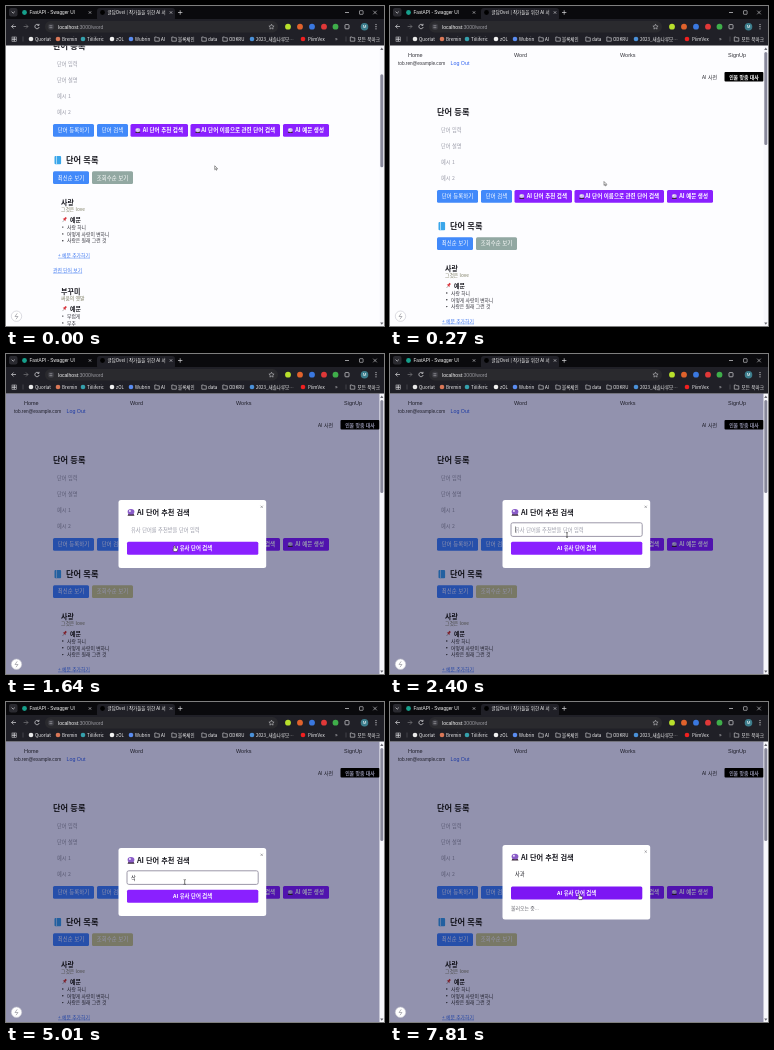
Animation, 378 px wide and 320 px high, one loop 8000 ms. Source, as an HTML page:

```html
<!DOCTYPE html>
<html lang="ko">
<head>
<meta charset="utf-8">
<style>
html, body { margin: 0; width: 100%; height: 100%; overflow: hidden; background: #fdfdff; }
svg { display: block; width: 378px; height: 320px; font-family: "Noto Sans CJK KR", "Noto Sans CJK", "Noto Sans", sans-serif; }
text { white-space: pre; }
#shade { mix-blend-mode: multiply; }
.latin { font-family: "Liberation Sans", Arial, sans-serif; }
.b { font-weight: 700; }
.m { font-weight: 500; }
.u { text-decoration: underline; text-decoration-thickness: 0.4px; }
.end { text-anchor: end; }
.mid { text-anchor: middle; }
</style>
</head>
<body>
<svg id="stage" viewBox="0 0 378 320" xmlns="http://www.w3.org/2000/svg"></svg>
<script>
const LOOP = 8000;
const BLUE = '#4189fa', PURPLE = '#8a20ff', INK = '#1d1d24', GREY = '#9a9ba8', PALE = '#d8d8dc';
const STRIP = '#0a0a0d', BAR = '#202027';

// y is the vertical middle of the text
const text = (x, y, size, str, fill = INK, cls = '') =>
  `<text x="${x}" y="${(y + size * 0.36).toFixed(2)}" font-size="${size}" fill="${fill}" class="${cls}">${str}</text>`;
const rect = (x, y, w, h, fill, r = 0, extra = '') =>
  `<rect x="${x}" y="${y}" width="${w}" height="${h}" rx="${r}" fill="${fill}" ${extra}/>`;
const dot = (x, y, r, fill, extra = '') => `<circle cx="${x}" cy="${y}" r="${r}" fill="${fill}" ${extra}/>`;
const line = (d, stroke = PALE, w = 0.7) => `<path d="${d}" fill="none" stroke="${stroke}" stroke-width="${w}"/>`;
const folder = (x, y) => line(`M${x - 2.2} ${y - 2}h1.8l.7.8h2v3.4h-4.5z`, PALE, 0.6);
const cross = (x, y, r, c) => line(`M${x - r} ${y - r}l${2 * r} ${2 * r}m0 ${-2 * r}l${-2 * r} ${2 * r}`, c, 0.6);
const orb = (x, y, s, fill) => `<g transform="translate(${x} ${y}) scale(${s})">
  <path d="M-2.6 2.6L-1.8 1H1.8L2.6 2.6Z" fill="#3a2838"/><ellipse cy="-.4" rx="2.5" ry="2.1" fill="${fill}"/>${dot(-0.8, -1, 0.7, '#f4ecff')}</g>`;
const pin = (x, y) => line(`M${x} ${y}l-2 2.4`, '#888', 0.6) +
  `<path d="M${x - 1.8} ${y - 1}L${x + 1} ${y + 1.6}L${x + 1} ${y}L${x + 2.4} ${y - 1.6}L${x + 1} ${y - 2.8}L${x - 0.4} ${y - 1.2}Z" fill="#d8343c"/>`;

function browser() {
  const marks = [
    [25, 29, 'Quorlat', '#e8e8e8'], [52, 56, 'Bremin', '#d97757'], [77, 81, 'Tilliferic', '#35a0ac'],
    [106, 110, 'zOL', '#f0f0f0'], [125, 129, 'Wubrin', '#5a8cf0'], [151, 155, 'AI'], [168, 172, '블록체인'],
    [198, 202, 'data'], [219, 223, 'ODKRU'], [246, 250, '2023_새솔나루모…', '#4a90d8'], [297, 302, 'PlimVex', '#f02020']
  ];
  const tools = [[282, '#b8e02c'], [294, '#e0622c'], [306, '#3a78e0'], [318, '#e03838'], [329.5, '#3fae4a']];
  return rect(0, 0, 378, 14, STRIP) + rect(0, 13, 378, 26.5, BAR) +
    rect(3, 2, 8.5, 8.5, '#2a2a30', 2) + line('M5.6 5.6l1.6 1.6l1.6-1.6') +
    dot(18.5, 6.5, 2.4, '#16a08c') + text(23.5, 6.5, 4.7, 'FastAPI - Swagger UI', '#f2f2f2', 'latin') + cross(84, 6.5, 1.2, PALE) +
    rect(91, 2, 78, 13, BAR, 3) + dot(96.5, 6.5, 2.4, '#000') +
    text(101.5, 6.5, 4.5, '글담Ovel | 작가들을 위한 AI 서', '#f2f2f2') + rect(160, 2, 3, 10, BAR) + cross(165, 6.5, 1.2, PALE) +
    line('M172 6.5h4.4M174.2 4.3v4.4') +
    line('M339 6.5h4') + rect(353.5, 4.7, 3.6, 3.6, 'none', 0.4, `stroke="${PALE}" stroke-width=".6"`) + cross(369, 6.5, 1.8, PALE) +
    line('M10 20.5H5.6m2-2l-2 2l2 2') + line('M17.6 20.5H22m-2-2l2 2l-2 2', '#77777c') +
    line('M32.8 19.2a2.2 2.2 0 1 0 .4 1.8M33 17.8v1.6h-1.6') +
    rect(39, 15, 233, 11.5, '#2a2a2e', 5.7) + dot(45, 20.7, 3.2, '#3a3a40') +
    line('M43.4 19.8h3M43.4 21.7h3', PALE, 0.5) +
    text(52, 20.7, 5.1, 'localhost<tspan fill="#9a9aa0">:3000/word</tspan>', '#f2f2f2', 'latin') +
    line('M265.5 18.2l.8 1.7l1.8.2l-1.3 1.2l.3 1.8l-1.6-.9l-1.6.9l.3-1.8l-1.3-1.2l1.8-.2z', PALE, 0.5) +
    tools.map(([x, c]) => dot(x, 20.7, 2.9, c)).join('') +
    rect(339, 18.6, 4, 4.2, 'none', 0.7, `stroke="${PALE}" stroke-width=".7"`) +
    dot(358.5, 20.7, 3.8, '#3c7d8c') + text(358.5, 20.7, 4.4, 'M', '#fff', 'latin mid') +
    [18.6, 20.7, 22.8].map(y => dot(370, y, 0.6, PALE)).join('') +
    [6, 8.6].map(x => [31, 33.6].map(y => rect(x, y, 2, 2, 'none', 0, `stroke="${PALE}" stroke-width=".5"`)).join('')).join('') +
    line('M17 30.5v5', '#66666c', 0.5) +
    marks.map(([ix, x, s, c]) => (c ? dot(ix, 33, 2.3, c) : folder(ix, 33)) + text(x, 33, 4.5, s, '#f0f0f2')).join('') +
    text(329, 32.6, 5.5, '»', PALE) + line('M340 30.5v5', '#66666c', 0.5) + folder(346.5, 33) +
    text(351.5, 33, 4.6, '모든 북마크', '#f0f0f2');
}

function button(x, y, w, label, fill, id = '') {
  return rect(x, y, w, 12.7, fill, 1.5, id) + text(x + w / 2, y + 6.3, 5.4, label, '#fff', 'mid m');
}
function aiButton(x, w, label) {
  return rect(x, 184, w, 12.7, PURPLE, 1.5) + orb(x + 7.3, 190.4, 1, '#cfc2e8') + text(x + w - 5, 190.3, 5.5, label, '#fff', 'b end');
}
function entry(y, word, note, samples) {
  return text(55, y, 7, word, INK, 'b') + text(55, y + 7.6, 4.8, note, '#77775c') +
    pin(58.5, y + 17.6) + text(64, y + 17.6, 5.9, '예문', INK, 'b') +
    samples.map((s, i) => dot(56.8, y + 25 + i * 6.8, 0.7, INK) + text(61, y + 25 + i * 6.8, 4.8, s, '#33333c')).join('');
}

function page() {
  const nav = [[18, 'Home'], [124, 'Word'], [230, 'Works'], [338, 'SignUp']];
  const fields = ['단어 입력', '단어 설명', '예시 1', '예시 2'];
  return nav.map(([x, s]) => text(x, 49, 5.5, s, '#33333a', 'latin')).join('') +
    text(8, 57, 4.7, 'tob.ren@example.com', '#33333a', 'latin') + text(60.5, 57, 5.3, 'Log Out', '#2f62f0', 'latin') +
    text(312, 71, 5, 'AI 사전', '#33333a') +
    rect(334.5, 66, 39, 9.6, '#000', 1) + text(354, 70.8, 4.9, '인물 맞춤 대사', '#fff', 'mid b') +
    text(47, 106.3, 8.2, '단어 등록', INK, 'b') +
    fields.map((s, i) => text(51, 124.3 + i * 15.8, 5.2, s, GREY)).join('') +
    button(47, 184, 41, '단어 등록하기', BLUE) + button(91, 184, 31, '단어 검색', BLUE) +
    aiButton(124.5, 57.5, 'AI 단어 추천 검색') + aiButton(184.5, 89.5, 'AI 단어 이름으로 관련 단어 검색') + aiButton(277, 46, 'AI 예문 생성') +
    rect(48.5, 216, 6.6, 8.2, '#3aa6ea', 1) + rect(50, 216, 0.8, 8.2, '#bfe4fa') +
    text(60, 220, 8.2, '단어 목록', INK, 'b') +
    button(47, 231.2, 36, '최신순 보기', BLUE) + button(86, 231.2, 41, '조회수순 보기', '#92a8a2', 'id="byViews"') +
    entry(262, '사랑', '그것은 love', ['사랑 하니', '어떻게 사랑이 변하니', '사랑은 원래 그런 것']) +
    text(52, 315, 4.8, '+ 예문 추가하기', '#3f78f0', 'u') + text(47, 330, 4.8, '관련 단어 보기', '#3f78f0', 'u') +
    entry(351, '부꾸미', '싸움의 옛말', ['부럽게', '부추']);
}

function modal() {
  return rect(112.5, 146, 147.7, 68, '#fff', 2.5, 'id="box"') + '<g id="body">' +
    orb(125, 158.3, 1.35, '#8a5cc8') + text(131, 158.2, 7.2, 'AI 단어 추천 검색', INK, 'b') + cross(255.7, 152.8, 1.1, '#77777c') +
    rect(121, 168.8, 131.2, 13.6, '#fff', 1.8, 'id="field" stroke="#9c98a8" stroke-width="1"') +
    '<g id="hint">' + text(125, 175.7, 5.25, '유사 단어를 추천받을 단어 입력', GREY) + '</g>' +
    '<g id="typed">' + text(125, 175.7, 5.2, '', INK) + '</g>' + rect(0, 172.5, 0.5, 6.2, '#222', 0, 'id="caret"') +
    rect(121, 187.8, 131.3, 12.9, PURPLE, 1.5, 'id="go"') + text(186.6, 194.2, 5.35, 'AI 유사 단어 검색', '#fff', 'b mid') +
    '<g id="wait">' + text(121, 209.4, 4.9, '불러오는 중...', '#66666e') + '</g></g>';
}

const cursors = `<g id="cursor" stroke="#222" stroke-width=".6" stroke-linejoin="round">
  <path id="arrow" fill="#fff" transform="scale(.75)" d="M0 0V5.2L1.2 4.1L2.1 6L3 5.5L2.2 3.8H3.8Z"/>
  <path id="hand" fill="#fff" transform="scale(.9)" d="M-.7.6Q0-.6.7.6V2.8L3 3.3Q3.6 3.6 3.4 4.6L2.8 6.8H-.6L-2.1 4.5Q-1.8 3.7-.7 4.3Z"/>
  <path id="beam" fill="none" d="M-1-2.4Q0-2.4 0-1.9V1.9Q0 2.4-1 2.4M1-2.4Q0-2.4 0-1.9M0 1.9Q0 2.4 1 2.4"/></g>`;

document.getElementById('stage').innerHTML =
  '<clipPath id="view"><rect y="39.5" width="374" height="281"/></clipPath>' +
  rect(0, 39, 378, 281, '#fdfdff') + `<g clip-path="url(#view)"><g id="page">${page()}</g></g>` +
  rect(0, 39.5, 373.7, 281, '#9393ae', 0, 'id="shade"') + `<g id="modal">${modal()}</g>` +
  rect(373.7, 39.5, 4.3, 281, '#f8f8fc') + rect(374.3, 46, 3, 93, '#88889a', 1.5, 'id="thumb"') +
  '<path d="M374.2 44l1.6-2.4l1.6 2.4zM374.2 316.4l1.6 2.4l1.6-2.4z" fill="#66666e"/>' +
  dot(10.5, 310.2, 5.2, '#fff', 'stroke="#c4c4ce" stroke-width=".6"') +
  line('M11.2 307.4l-2.2 3.1h3l-2 2.7', '#85858e', 0.6) + browser() + cursors;

const el = {};
document.querySelectorAll('[id]').forEach(n => el[n.id] = n);
const typed = el.typed.firstChild;
const show = (n, on) => n.setAttribute('visibility', on ? 'inherit' : 'hidden');
const shift = (n, x, y) => n.setAttribute('transform', `translate(${x.toFixed(2)} ${y.toFixed(2)})`);

const OPEN = 1570, FOCUS = 2400, SEND = 6650;
const scroll = [[0, 66], [40, 62], [140, 43], [270, 0]];
const pointer = [
  [0, 208.7, 159.7], [40, 209.5, 162], [140, 214, 175.5], [450, 214, 175.5], [1300, 168.5, 191.5], [1700, 168.5, 191.5],
  [2170, 177, 181], [2600, 177, 181], [2640, 178.7, 180], [6310, 178.7, 180], [6560, 193.5, 189.8],
  [7410, 193.5, 189.8], [7540, 190.5, 190], [7740, 190.5, 190], [7810, 189.5, 191.5]
];
// time, field text, caret x (0 = hidden)
const typing = [
  [0, '', 0], [FOCUS, '', 125], [2910, '', 0], [3440, '', 125], [4010, '', 0], [4470, 'ㅅ', 0], [4570, '사', 0],
  [5010, '삭', 0], [5170, '사고', 0], [5210, '사과', 134.6], [5610, '사과', 0], [6110, '사과', 134.6], [SEND, '사과', 0]
];

function at(rows, t) {
  const i = rows.findIndex(r => r[0] > t);
  if (i < 0) return rows[rows.length - 1].slice(1);
  const a = rows[i - 1], b = rows[i], k = (t - a[0]) / (b[0] - a[0]);
  return a.slice(1).map((v, j) => v + (b[j + 1] - v) * k);
}

function draw(t) {
  const [off] = at(scroll, t);
  shift(el.page, 0, -off);
  shift(el.thumb, 0, off * 0.336);

  const open = t >= OPEN, sent = t >= SEND;
  show(el.shade, open);
  show(el.modal, open);
  el.byViews.setAttribute('fill', open ? '#d0d094' : '#92a8a2');
  el.box.setAttribute('y', sent ? 143 : 146);
  el.box.setAttribute('height', sent ? 74.5 : 68);
  shift(el.body, 0, sent ? -3.2 : 0);
  show(el.wait, sent);
  el.go.setAttribute('fill', sent ? '#7d16f4' : PURPLE);

  const [, word, caret] = typing.filter(r => r[0] <= t).pop();
  el.field.setAttribute('stroke-opacity', t >= FOCUS && !sent ? 1 : 0);
  show(el.hint, !word);
  typed.textContent = word;
  show(el.caret, caret > 0);
  el.caret.setAttribute('x', caret);

  const [x, y] = at(pointer, t);
  const hand = open ? y >= 187 : y >= 184 && x < 182;
  const beam = open && y < 183;
  shift(el.cursor, x, y);
  show(el.hand, hand);
  show(el.beam, beam);
  show(el.arrow, !hand && !beam);
}

const start = performance.now();
function tick() {
  draw((performance.now() - start) % LOOP);
  requestAnimationFrame(tick);
}
tick();
</script>
</body>
</html>
```
